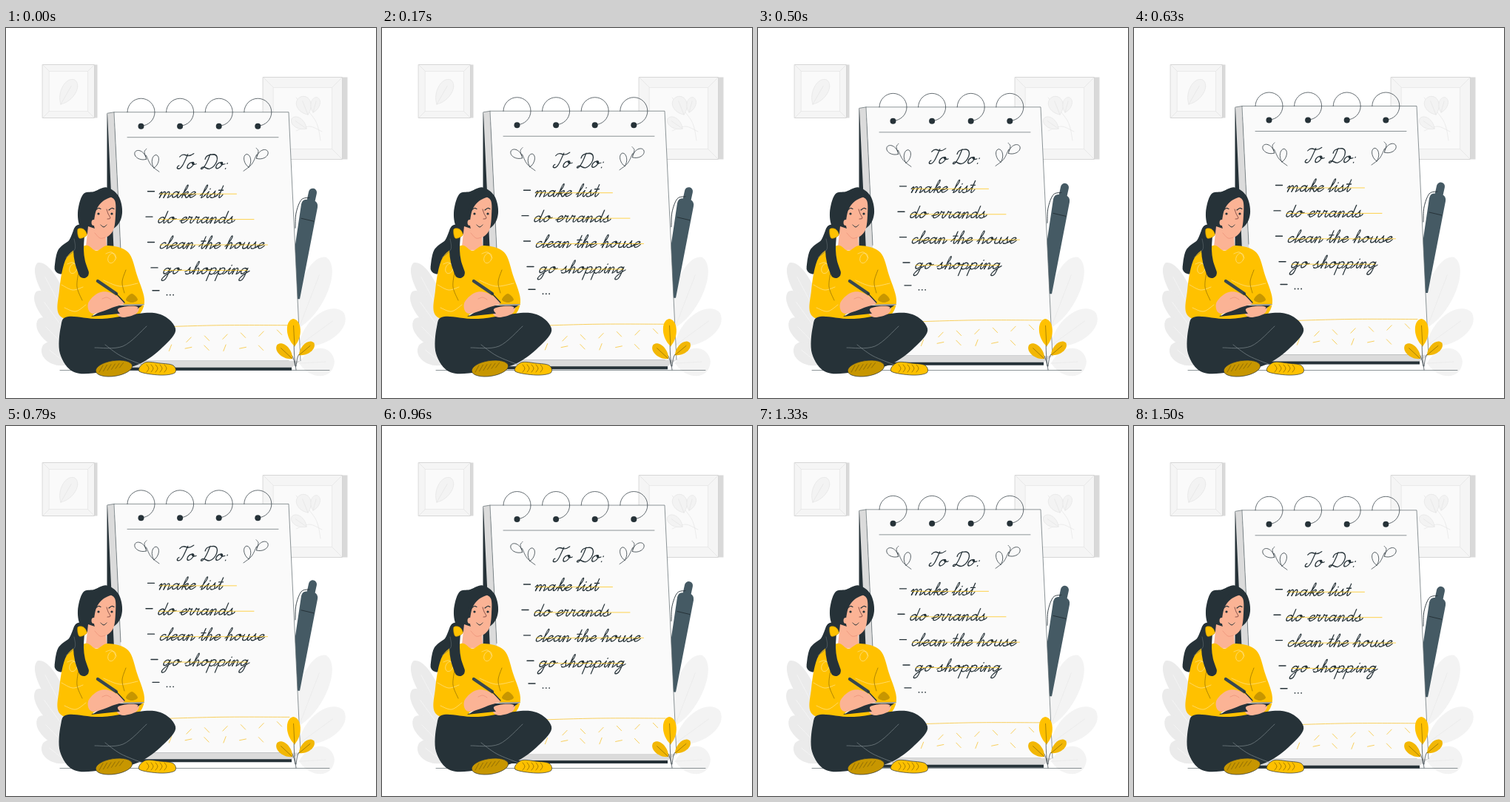
Write an HTML page with a canvas that moves like this. It is 500 px wide and 500 px high and loops after 1.54 s.

```html
<!DOCTYPE html>
<html lang="en">
<head>
<meta charset="utf-8">
<title>To do list</title>
<style>
html, body { margin: 0; width: 100%; height: 100%; overflow: hidden; background: #fff; }
canvas { display: block; width: 500px; height: 500px; }
</style>
</head>
<body>
<canvas id="stage" width="500" height="500" role="img"
  aria-label="To Do: make list, do errands, clean the house, go shopping, ..."></canvas>
<script>
const ctx = document.getElementById('stage').getContext('2d');
const LOOP = 1540, RISE = 8.6, PHASE = 45;
const INK = '#263238', LINE = '#5c676c', YELLOW = '#ffc100', OCHRE = '#c79600', SKIN = '#fbb395', PAPER = '#fafafa';

// Pen strokes shared by the cursive letters: [advance, path].
const STROKES = {
  lead: [2.5, 'M-1-3Q1-5 2.8-8'],
  stem: [4, 'M.5-8C-.5-2 0 0 1.5 0Q3 0 4.5-4'],
  tall: [4, 'M1-16C0-4 0 0 1.5 0Q3 0 4.5-4'],
  tail: [4, 'M.5-8C0 6-1 9-4 9-8 9-6 3 4-4'],
  drop: [1, 'M1-8L0 9'],
  down: [1, 'M-1-5Q1-9 1.500-7L1 0'],
  loop: [2, 'M-.5-3C4-7 6-17 4-17 2-17 2-6 2 0'],
  hump: [5.5, 'M0 0Q1.500-8 4-8T5.500 0'],
  exit: [3.5, 'M0 0Q2 0 4-4'],
  bowl: [8, 'M8-6C6-9.500 1-8 1-3.500 1 1 6 1 8-6'],
  knot: [2.5, 'M0-6Q-1-9-3-8-1-4 3-6'],
  belly: [6.5, 'M0-5C2-10 7.500-9 7-4 6 1 1 1 0-1'],
  cup: [7, 'M1-8C0-2 0 0 3 0 6 0 7-4 7-8'],
  curl: [8, 'M7-7C5-9.500 1-7 1-3.500 1 1 5 1 8.500-4'],
  eye: [0, 'M-1-3Q7-4 7-7'],
  arm: [8, 'M0-3C3-9 7-9 6-6 5-4 3-4 1-4 5-4 4 0 6 0Q8 0 9-4'],
  wave: [8, 'M-1-3Q2-4 4-9C3-5 7-3 5.500-1 4 .5 1 .5.5-1M5-1Q8-1 9-4'],
  nib: [4.5, 'M-1-3Q1-5 1-9 2-7 5-8'],
  bar: [0, 'M-7-10h6'],
  dot: [0, 'M-3-12v.6'],
  colon: [4, 'M2.500-7v.6M2.500-.6v.6'],
  roof: [12, 'M0-15Q2-19 7-17T16-19M9-18C8-8 8 0 4 0 1 0 1-3 3-4'],
  dee: [17, 'M6-18C6-8 5-3 3 0 1 1 0-1 2-2 6-3 8 1 12 0 19-2 20-17 10-18 5-18 1-16 2-12'],
  gap: [6, '']
};
const LETTERS = {
  a: 'bowl stem', c: 'curl', d: 'bowl tall', e: 'eye curl', g: 'bowl tail', h: 'loop hump exit',
  i: 'lead stem dot', k: 'loop arm', l: 'loop exit', m: 'down hump hump exit', n: 'down hump exit',
  o: 'bowl knot', p: 'drop belly exit', r: 'nib stem', s: 'wave', t: 'lead tall bar', u: 'cup stem',
  T: 'roof', D: 'dee', ':': 'colon', ' ': 'gap'
};
const TASKS = [
  { text: 'make list', x: 206.5, strike: 103 },
  { text: 'do errands', x: 204, strike: 129 },
  { text: 'clean the house', x: 206.5, strike: 145 },
  { text: 'go shopping', x: 211, strike: 113 }
];

function paint(path, fill, stroke, width = 0.7) {
  if (fill) { ctx.fillStyle = fill; ctx.fill(path); }
  if (stroke) { ctx.strokeStyle = stroke; ctx.lineWidth = width; ctx.stroke(path); }
}

const shape = (d, fill, stroke, width) => paint(new Path2D(d), fill, stroke, width);
const line = (d, color = INK, width = 0.7) => shape(d, null, color, width);

// Smooth curve through "x y x y ...".
function smooth(coords, closed) {
  const n = coords.split(' ').map(Number), count = n.length / 2;
  const at = i => {
    const k = closed ? (i + count) % count : Math.max(0, Math.min(count - 1, i));
    return [n[2 * k], n[2 * k + 1]];
  };
  const path = new Path2D();
  path.moveTo(...at(0));
  for (let i = 0; i < count - !closed; i++) {
    const [a, b, c, d] = [at(i - 1), at(i), at(i + 1), at(i + 2)];
    path.bezierCurveTo(b[0] + (c[0] - a[0]) / 6, b[1] + (c[1] - a[1]) / 6,
      c[0] - (d[0] - b[0]) / 6, c[1] - (d[1] - b[1]) / 6, ...c);
  }
  return path;
}

const blob = (coords, fill, stroke, width) => paint(smooth(coords, true), fill, stroke, width);
const curve = (coords, color = INK, width = 0.7) => paint(smooth(coords, false), null, color, width);

function oval(x, y, rx, ry = rx, fill = INK, turn = 0, stroke) {
  const path = new Path2D();
  path.ellipse(x, y, rx, ry, turn, 0, 7);
  paint(path, fill, stroke);
}

function leaf(x, y, degrees, length, width, fill, stroke, vein) {
  ctx.save();
  ctx.translate(x, y);
  ctx.rotate(degrees * Math.PI / 180);
  const near = length * 0.3, far = length * 0.95;
  shape(`M0 0C${near} ${-width} ${far} ${-width} ${length} 0 ${far} ${width} ${near} ${width} 0 0`, fill, stroke);
  if (vein) line(`M0 0H${length * 0.75}`, vein);
  ctx.restore();
}

function write(text, x, y, size = 1) {
  ctx.save();
  ctx.transform(size, 0, -0.36 * size, size, x, y);
  for (const letter of text) {
    for (const name of LETTERS[letter].split(' ')) {
      const [advance, path] = STROKES[name];
      line(path, INK, 1.35 / size);
      ctx.translate(advance, 0);
    }
    ctx.translate(0.8, 0);
  }
  ctx.restore();
}

function picture(x, y, w, h, inset, depth) {
  shape(`M${x + w} ${y}h${depth}v${h}h${-depth}z`, '#d9d9d9');
  shape(`M${x} ${y}h${w}v${h}h${-w}z`, '#f5f5f5', '#c8c8c8');
  shape(`M${x + inset} ${y + inset}h${w - 2 * inset}v${h - 2 * inset}h${2 * inset - w}z`, PAPER, '#e6e6e6');
  for (const [cx, sx] of [[x, 1], [x + w, -1]])
    for (const [cy, sy] of [[y, 1], [y + h, -1]])
      line(`M${cx} ${cy}l${sx * inset} ${sy * inset}`, '#e2e2e2');
}

function drawPictures() {
  const pale = '#f3f3f3', edge = '#e6e6e6';
  picture(49.5, 49.5, 70, 72, 9, 4);
  leaf(74, 103, -60, 38, 13, pale, edge, edge);
  picture(347.5, 66.5, 107, 111, 14, 7);
  curve('425 152 418 125 392 94', edge);
  curve('427 140 410 133 392 139', edge);
  leaf(408, 117, -112, 26, 13, pale, edge, edge);
  leaf(415, 114, -75, 21, 8, pale, edge, edge);
  leaf(406, 136, -145, 24, 9, pale, edge, edge);
}

function drawFoliage() {
  for (let i = 0; i < 3; i++)
    leaf(396, 405 + 24 * i, -69 + 33 * i, 102 - 27 * i, 25, '#f3f3f3', null, '#e9e9e9');
  for (let i = 0; i < 4; i++)
    leaf(84, 395 + 20 * i, -118 - 8 * i, 88 - 15 * i, 18, '#ebebeb', null, '#f7f7f7');
  line('M73 462.500H437', LINE);
}

function drawPen() {
  line('M414.500 222L411 238', '#455a64', 11);
  shape('M399 238Q401 230 408 232L416 233Q422 235 421 242L397 366H380Z', '#455a64');
  line('M399 257L416 261', INK, 1);
  curve('410 229 399 232 392 250 391 270', INK, 0.9);
}

function drawSprig() {
  curve('207 194 196 185 189.500 172');
  leaf(189.5, 177, -147, 18, 7, null, INK);
  leaf(200, 189, -80, 18, 6, null, INK);
  curve('189 174 187 167 190 163');
}

function drawConfetti() {
  for (let i = 0; i < 12; i++) {
    const column = i >> 1, upper = i % 2;
    const angle = upper ? 0.8 * (-1) ** (column + 1) : column % 3 - 1.2;
    const x = 222 + 24.5 * column + 25 * upper, y = upper ? 421 - 2 * column : 432;
    const dx = 4.5 * Math.cos(angle), dy = 4.5 * Math.sin(angle);
    line(`M${x - dx} ${y - dy}l${2 * dx} ${2 * dy}`, '#f8ca4b', 0.9);
  }
}

function drawPad() {
  shape('M136.500 115L386 454V462.500H136.500Z', INK);
  shape('M137 115L146 113.500 162 449.500H398L386 458.500H153Z', '#dbdbdb');
  shape('M146 113.500H382L398 449.500H162Z', PAPER);
  line('M137 115L146 113.500H382L398 449.500M146 113.500L155 300', LINE);
  line('M164 147.500H368', LINE);

  for (let i = 0; i < 4; i++) {
    const x = 182.5 + 52.6 * i;
    const ring = new Path2D();
    ring.arc(x, 113.5, 18.5, Math.PI, Math.PI * 2.5);
    paint(ring, null, INK);
    oval(x, 132.5, 4);
  }

  drawSprig();
  ctx.save();
  ctx.translate(528, -1);
  ctx.scale(-1, 1);
  drawSprig();
  ctx.restore();
  write('To Do:', 229, 190, 1.08);

  TASKS.forEach(({ text, x, strike }, i) => {
    const y = 229 + 34.4 * i;
    write(text, x, y);
    line(`M${x - 15} ${y - 8.5}h9`, INK, 1.4);
    line(`M${x + 2} ${y - 5}h${strike}`, YELLOW);
  });
  line('M198 354.500h9', INK, 1.4);
  for (let i = 0; i < 3; i++) oval(217.5 + 4.3 * i, 360.5, 0.9);

  curve('200 404 290 401.500 383 401.500', '#f8ca4b', 0.9);
  drawConfetti();
}

function drawHead() {
  curve('100 274 92 292 78 304 74 324', INK, 17);
  blob('97 250 104 225 119 221 136 215.500 152 227 157 250 148 269 120 281 102 272', INK);
  shape('M111 268L108 295Q123 306 136 295L135 276Z', SKIN);
  blob('118 250 123 234 136 228 147 233 148 253 145 273 134 283 121 274', SKIN);
  blob('118 264 117 242 128 227 146 226 131 234 122 246', INK);
  oval(118.5, 263, 3, 4, SKIN);
  for (const x of [125, 143]) {
    oval(x, 251, 1.6);
    curve(`${x - 4} 246 ${x} 243.500 ${x + 3} 244.500`, INK, 1.2);
  }
  curve('136 245 138 251 141 257 137 258', '#7a4640', 0.9);
  curve('128 266 132 269 136 266', INK, 1);
  curve('120 277 127 284 134 283', '#e88e76');
}

function drawSweater() {
  blob('107 294 122 301 138 294 165 303 177 334 187 371 170 394 120 398 74 390 72 355 82 310', YELLOW);
  for (const [x, y] of [[91, 325], [143, 311]]) {
    oval(x, y, 5, 7, null, 0.4, '#ffe491');
    curve(`${x - 8} ${y - 6} ${x} ${y - 8} ${x + 6} ${y}`, '#ffe491');
  }
  curve('75 347 90 354 104 350', '#ffe491');
  curve('132 341 154 349 178 345', '#ffe491');
  curve('79 378 94 383 108 374', '#ffe491');
  curve('98 330 96 350 103 368', '#8c6b05');
  curve('162 327 157 343 160 358', '#8c6b05');
  curve('99 280 98 300 100 316 105 331', INK, 14);
  curve('92 285 93 299 81 310', LINE);
  blob('97 272 105 272 109 280 99 284', YELLOW, OCHRE);
  blob('162 367 170 359 178 367 170 371', OCHRE);
}

function drawLegs() {
  blob('84 390 130 393 200 385 229 406 212 431 178 455 130 465 92 465 73 440 74 404', INK);
  curve('134 428 155 443 184 455', '#7b878c');
  curve('120 432 158 430 190 403', '#7b878c');
  oval(146, 460, 25, 10.5, OCHRE, -0.15, INK);
  for (let i = 0; i < 6; i++) line(`M${131 + 5.5 * i} ${456 - 0.7 * i}l-5 ${9 - i / 2}`, '#7a5e08');
  blob('180 464 188 452 208 453 226 456 228 466 208 469', YELLOW, INK);
  for (let i = 0; i < 5; i++) curve(`${190 + 6 * i} 455 ${193 + 6 * i} 460 ${190 + 6 * i} 465`, '#7a5e08');
}

function drawHands() {
  blob('150 385 163 377 179 376 176 386 158 391', SKIN);
  shape('M115 390L139 374 187 373 171 384Z', INK);
  line('M118 388L140 374.500 186 374', '#fff', 1.2);
  blob('111 372 125 358 142 358 160 371 146 377 117 386', SKIN);
  blob('151 380 164 376 178 377 172 385 158 388', SKIN);
  curve('142 367 136 364 130 366', '#e88e76');
  line('M124 342L149 359', '#37474f', 4.4);
  line('M148 358L160 371', INK, 1.4);
}

function drawPlant() {
  const vein = '#8c6b05';
  curve('392 462 389.500 440 389 404', INK);
  curve('391 457 386 442 371 431', INK);
  curve('392 457 396 441 412 430', INK);
  leaf(390, 430, -93, 37, 12, YELLOW, null, vein);
  leaf(387, 447, -137, 28, 10, '#f2b705', null, vein);
  leaf(396, 442, -40, 26, 9, '#f2b705', null, vein);
}

function draw(now) {
  const lift = RISE * (1 - Math.cos((now + PHASE) / LOOP * Math.PI * 2)) / 2;
  ctx.lineCap = ctx.lineJoin = 'round';
  ctx.fillStyle = '#fff';
  ctx.fillRect(0, 0, 500, 500);
  drawPictures();
  drawFoliage();
  ctx.save();
  ctx.translate(0, 0.3 - lift);
  drawPen();
  drawPad();
  ctx.restore();
  drawHead();
  drawSweater();
  drawLegs();
  drawHands();
  drawPlant();
}

const start = performance.now();
function tick() {
  draw(performance.now() - start);
  requestAnimationFrame(tick);
}
tick();
</script>
</body>
</html>
```
